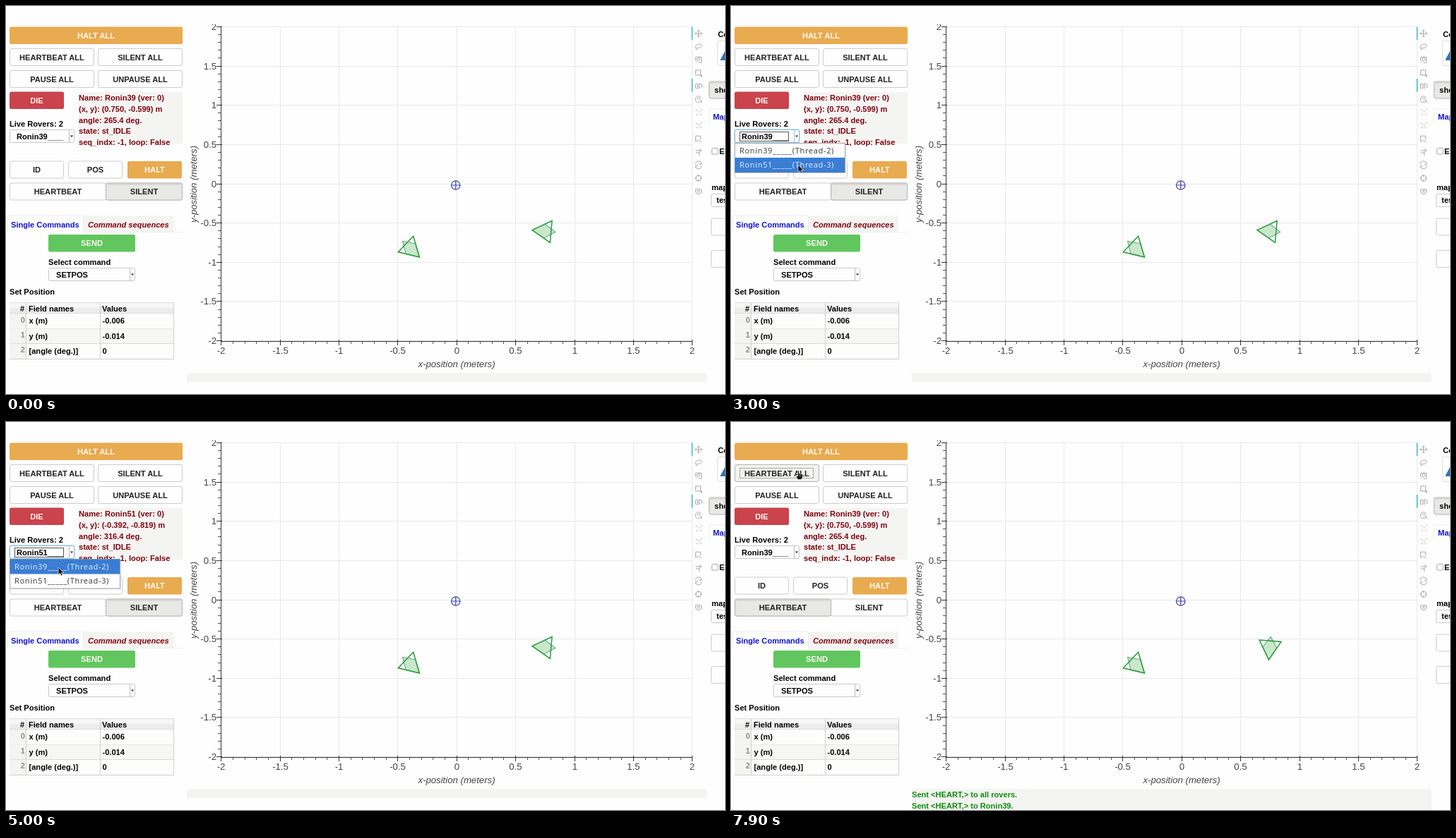
Write an HTML page that moves like this. It is 1018 px wide and 550 px high and loops after 8000 ms.

```html
<!DOCTYPE html>
<html lang="en">
<head>
<meta charset="utf-8">
<title>Rover control panel</title>
<style>
html, body { margin: 0; width: 100%; height: 100%; overflow: hidden; background: #fefefe; }
svg { display: block; }
text { font: bold 11.1px "Liberation Sans", Arial, sans-serif; white-space: pre; }
.axis text { font-weight: normal; font-size: 13.2px; fill: #444; }
.italic, .axis .italic { font-style: italic; }
.menu text { font: 11px "Noto Sans", sans-serif; letter-spacing: .65px; }
</style>
</head>
<body>
<svg id="stage" width="1018" height="550" viewBox="0 0 1018 550"></svg>
<script>
const LOOP = 8000;
const stage = document.getElementById('stage');

// Markup helpers; `on` lists visible time spans such as "0-800 1200-1500".
const on = (spans, body) => `<g data-on="${spans}">${body}</g>`;
const text = (x, y, s, fill = '#000', more = '') =>
  `<text x="${x}" y="${y}" fill="${fill}" ${more}>${s.replace(/</g, '&lt;').replace(/>/g, '&gt;')}</text>`;
const mid = 'text-anchor="middle"';
const rect = (x, y, w, h, fill, stroke = 'none', r = 0) =>
  `<rect x="${x}" y="${y}" width="${w}" height="${h}" rx="${r}" fill="${fill}" stroke="${stroke}"/>`;
const path = (d, stroke, fill = 'none', width = 1) =>
  `<path d="${d}" stroke="${stroke}" fill="${fill}" stroke-width="${width}"/>`;

function button(x, y, w, label, fill = '#fefefe', stroke = '#ccc') {
  return rect(x + .5, y + .5, w - 1, 24, fill, stroke, 2.5) +
    text(x + w / 2, y + 16.5, label, '#222', mid);
}
const colored = (x, y, w, label, fill) =>
  rect(x, y + .5, w, 24.5, fill, 'none', 2.5) + text(x + w / 2, y + 16.8, label, '#fdf8f0', mid);
const hover = (x, y, w, label) => button(x, y, w, label, '#f2f2f0', '#b5b5b5');

function pressed(x, y, w, label) {
  return button(x, y, w, label, '#e8e8e6', '#b0b0b0') +
    path(`M${x + 2} ${y + 2}h${w - 4}`, '#d4d4d2', 'none', 2);
}

function select(x, y, w) {
  return rect(x + .5, y + .5, w - 1, 18, '#fefefe', '#c8c8c8', 2) +
    path(`M${x + w - 7.5} ${y + 1}v17`, '#bbb') +
    path(`M${x + w - 6} ${y + 8.5}h4l-2 2.5z`, 'none', '#222');
}

function roverInfo(name, pos, angle) {
  return [`Name: ${name} (ver: 0)`, `(x, y): ${pos} m`, `angle: ${angle} deg.`,
    'state: st_IDLE', 'seq_indx: -1, loop: False']
    .map((s, i) => text(103, 134 + i * 15.8, s, '#7d0510')).join('') +
    `<svg x="14" y="176" width="67.5" height="17">${text(1, 12.7, name + '_____')}</svg>`;
}

function leftPanel() {
  const first = '0-3400 5500-8000', second = '3400-5500';
  const focus = '2100-3400 3900-5500';
  const rows = [['x (m)', '-0.006'], ['y (m)', '-0.014'], ['[angle (deg.)]', '0']];
  let s = colored(5, 29, 245, 'HALT ALL', '#e8ab50') +
    button(5, 60, 120, 'HEARTBEAT ALL') + button(130, 60, 120, 'SILENT ALL') +
    button(5, 91, 120, 'PAUSE ALL') + button(130, 91, 120, 'UNPAUSE ALL') +
    on('1100-1200 6700-6800', hover(5, 91, 120, 'PAUSE ALL')) +
    on('6900-8000', hover(5, 60, 120, 'HEARTBEAT ALL')) +
    on('7400-8000', '<rect x="12.5" y="65.5" width="104" height="14" fill="none" stroke="#888" stroke-dasharray="1.5 .7"/>') +
    colored(5, 121, 77, 'DIE', '#c9444d') +
    rect(103, 122, 147, 73, '#f4f4f2') +
    text(5, 171, 'Live Rovers: 2') + select(5, 175, 92) +
    on(focus, rect(4.5, 174.5, 93, 20, 'none', '#cfe4f5', 3) + rect(5.5, 175.5, 91, 18, 'none', '#86bce6', 2) +
      rect(12.5, 178.5, 69, 13, 'none', '#aaa')) +
    on('2200-3200 4500-5200', rect(12.5, 178.5, 69, 13, 'none', '#555')) +
    on(first, roverInfo('Ronin39', '(0.750, -0.599)', '265.4')) +
    on(second, roverInfo('Ronin51', '(-0.392, -0.819)', '316.4')) +
    button(5, 219.5, 77, 'ID') + button(88, 219.5, 77, 'POS') +
    on('3400-3600', hover(88, 219.5, 77, 'POS')) +
    colored(172, 219.5, 77, 'HALT', '#e8ab50') +
    button(5, 250.5, 137, 'HEARTBEAT') + button(141, 250.5, 109, 'SILENT') +
    on('0-7900', pressed(141, 250.5, 109, 'SILENT')) +
    on('7900-8000', pressed(5, 250.5, 137, 'HEARTBEAT'));

  s += rect(110, 297, 127, 23, '#f4f4f2') + path('M110 320.5h143', '#eee') +
    path('M2.5 320v-23h107v23', '#ececec') +
    text(7, 314, 'Single Commands', '#1414c8') +
    text(116, 314, 'Command sequences', '#7d0510', 'class="italic"') +
    colored(60, 323.5, 123, 'SEND', '#62c65f') +
    text(60, 367, 'Select command') + select(60, 371, 123) + text(71, 385, 'SETPOS') +
    text(5, 409, 'Set Position');

  s += rect(5, 420, 233, 8, '#f6f6f6') + rect(5, 428, 233, 8, '#ececec') +
    path('M5 420.5H238M5 435.5H238', '#dcdcdc') +
    text(20, 433, '#') + text(32, 433, 'Field names') + text(136, 433, 'Values');
  rows.forEach(([name, value], i) => {
    const y = 436 + i * 21.4;
    s += rect(5, y, 233, 21, i % 2 ? '#f6f6f4' : '#fdfdfc') + rect(5, y, 24, 21, '#f4f4f2') +
      path(`M5 ${Math.round(y + 21) + .5}H238`, '#cfcfcf') +
      text(27, y + 12.6, String(i), '#8c8c8c', 'text-anchor="end"') +
      text(32.5, y + 14.2, name) + text(136.5, y + 14.2, value);
  });
  return s + path('M28.5 421V500M133.5 421V500M237.5 421V500', '#cfcfcf');
}

function menu() {
  const item = (y, label, spans) => text(12, y + 14, label, '#444') +
    on(spans, rect(5.5, y, 155.5, 21, '#3a7dd2') + text(12, y + 14, label, '#dce8f7'));
  return on('2200-3200 4500-5200', '<g class="menu">' +
    rect(6.5, 195.5, 156, 41.5, '#0002') + rect(5.5, 194.5, 156, 41.5, '#fefefe', '#a5a5a5') +
    item(194.5, 'Ronin39_____(Thread-2)', '2200-2800 4700-5200') +
    item(215, 'Ronin51_____(Thread-3)', '2800-3200 4500-4700') + '</g>');
}

const px = v => 637.8 + v * 166.7;
const py = v => 252.5 - v * 111.3;

function plot() {
  let grid = '', ticks = '', minor = '', labels = '';
  for (let i = -20; i <= 20; i++) {
    const v = i / 10, x = Math.round(px(v)) + .5, y = Math.round(py(v)) - .5;
    if (i % 5) {
      minor += `M${x} 475v4M304 ${y}h-4`;
      continue;
    }
    grid += `M${x} 30V475M304 ${y}H971`;
    ticks += `M${x} 473v8M306 ${y}h-8`;
    labels += text(x, 493, String(v), '#444', mid) +
      text(298, y + 4.5, String(v), '#444', 'text-anchor="end"');
  }
  return path(grid, '#e8e8e8') + path(minor, '#555') + path(ticks + 'M304.5 30V475.5H971', '#333') +
    `<g class="axis">${labels}` +
    text(638, 511.5, 'x-position (meters)', '#444', 'class="italic" ' + mid) +
    text(0, 0, 'y-position (meters)', '#444', `class="italic" ${mid} transform="translate(270 252.5) rotate(-90)"`) +
    '</g>' + rect(256, 0, 740, 26, '#fefefe') +
    '<circle cx="636.7" cy="254" r="6.2" fill="none" stroke="#4545a8" stroke-width="1.2"/>' +
    path('M630.5 254h12.4M636.7 247.8v12.4', '#4545a8', 'none', 1.2);
}

// A kite body under a triangle that points along the heading.
const rover = (x, y, angle) =>
  `<g transform="translate(${px(x)} ${py(y)}) rotate(${-angle})">` +
  path('M17.9 0L.6 10L-15 0L.6-10z', '#4d9f8a', '#c9e8cb') +
  path('M17.9 0L-8.95 15.5V-15.5z', '#2a9a35', 'none', 1.5) + '</g>';

const rovers = () => rover(-.392, -.819, 316.4) +
  on('0-7900', rover(.75, -.599, 175)) + on('7900-8000', rover(.75, -.599, 265.4));

function toolbar() {
  const icons = [
    'M-5 0H5M0-5V5M-2-3L0-5L2-3M-2 3L0 5L2 3M-3-2L-5 0L-3 2M3-2L5 0L3 2',
    'M-4 2C-6-2 0-5 4-3C7 0 0 3-4 2L-2 5',
    'M-4-4H4V4H0M-4-4V1M-4 4L-1 1M2-1a2 2 0 1 0-4 0a2 2 0 1 0 4 0',
    'M-4-4H3V3H-4zM2 4H6M4 2V6',
    'M-4-3H-1V3H-4zM1-4V4M1-3H3a2 2 0 1 1 0 5',
    'M4-2A4.5 4.5 0 1 0 4 2M-2 0a2 2 0 1 1 4 0L5 5',
    'M-4-3h2M0-1h2M-3 3h2M2 3h2M3-4h2',
    'M-4-3h2M0-1h2M-3 3h2M2 3h2M3-4h2',
    'M-4-4H3V1M-4-4V4L0 2L4 5',
    'M-4-2H4M1-4L4-2L1 1M-4 1H1V5',
    'M-4-1A4 4 0 0 1 4-2M4-4V-1H1M4 1A4 4 0 0 1-4 2M-4 4V1H-1',
    'M4 0A4 4 0 1 0-4 0A4 4 0 1 0 4 0M-5 0H-2M2 0H5M0-5V-2M0 2V5',
    'M-4-3H4V1Q3 4 0 4Q-3 4-4 1zM-2-1H2M-2 1H2'
  ];
  return icons.map((d, i) =>
    `<g transform="translate(980.5 ${39 + i * 18.65})">${path(d, '#a8a8a8')}</g>`).join('') +
    path('M971.5 29.5V48M971.5 103V121.5', '#43b8c2', 'none', 1.6);
}

function rightPanel() {
  return text(1008, 43.5, 'Controls') + rect(1007.5, 49.5, 30, 35, '#fefefe', '#ddd', 2) +
    path('M1011 77L1020 60V77z', 'none', '#2f74b5') +
    pressed(995, 106.5, 60, '') + text(1003, 123, 'show') +
    path('M995.5 167V145.5H1018', '#eee') + text(1001, 161, 'Map', '#1414c8') +
    rect(999.5, 201.5, 8.5, 8.5, '#fefefe', '#aaa', 1) + text(1010, 210, 'Edit') +
    text(999, 261, 'map') + select(998, 266, 60) + text(1006, 279, 'test') +
    button(998, 300.5, 60, '') + button(998, 346, 60, '');
}

function messages() {
  return rect(256, 520, 736, 13, '#f4f4f2') + on('7900-8000', rect(256, 520, 736, 30, '#f4f4f2')) +
    on('7500-8000', text(256, 532, 'Sent <HEART,> to all rovers.', '#0c8a0c')) +
    on('7900-8000', text(256, 548.3, 'Sent <HEART,> to Ronin39.', '#0c8a0c'));
}

const pointers = '<g id="pointer">' +
  on('800-6900', path('M0 0V10.5L2.4 8.4L4.2 12L6 11.2L4.3 7.7H7.6z', '#f4f4f4', '#111', .7)) +
  on('6900-8000', path('M3 0H5V4L10 5V9L8 12.5H3L0 7L3 8z', '#f4f4f4', '#111', .7) +
    path('M5.5 5.5v3M7.5 6v2.5', '#ccc', 'none', .6)) + '</g>';

stage.innerHTML = rect(0, 0, 1018, 550, '#fefefe') + plot() + rovers() + toolbar() +
  rightPanel() + leftPanel() + messages() + menu() + pointers;

// Pointer positions as [time, x, y], held until the next entry.
const moves = [
  [0, -30, -30], [800, 144, 4], [1000, 147, 20], [1100, 112, 100], [1200, 98, 160],
  [1400, 84, 176], [1500, 69, 192], [1700, 78, 192], [1800, 86, 191], [1900, 84, 187],
  [2100, 83, 185], [2700, 92, 203], [2800, 104, 220], [3000, 95, 225],
  [3600, 88, 212], [3700, 84, 204], [3900, 78, 190], [4100, 75, 185],
  [4600, 78, 194], [4700, 79, 203], [4800, 73, 204], [5000, 74, 206], [5900, 75, 206.5],
  [6100, 82, 198], [6200, 98, 180], [6300, 120, 163], [6400, 138, 145], [6500, 146, 128],
  [6600, 128, 117], [6700, 112, 100], [6800, 103, 87], [6900, 92, 70], [7000, 91.5, 69]
];
const pointer = document.getElementById('pointer');
const timed = [...stage.querySelectorAll('[data-on]')].map(node => ({
  node, spans: node.dataset.on.split(' ').map(s => s.split('-').map(Number))
}));

function draw(now) {
  const t = now % LOOP;
  for (const { node, spans } of timed) {
    node.style.display = spans.some(([a, b]) => t >= a && t < b) ? '' : 'none';
  }
  const [, x, y] = moves.findLast(m => m[0] <= t);
  pointer.setAttribute('transform', `translate(${x} ${y})`);
}

let start;
function tick(now) {
  start ??= now;
  draw(now - start);
  requestAnimationFrame(tick);
}
draw(0);
requestAnimationFrame(tick);
</script>
</body>
</html>
```
